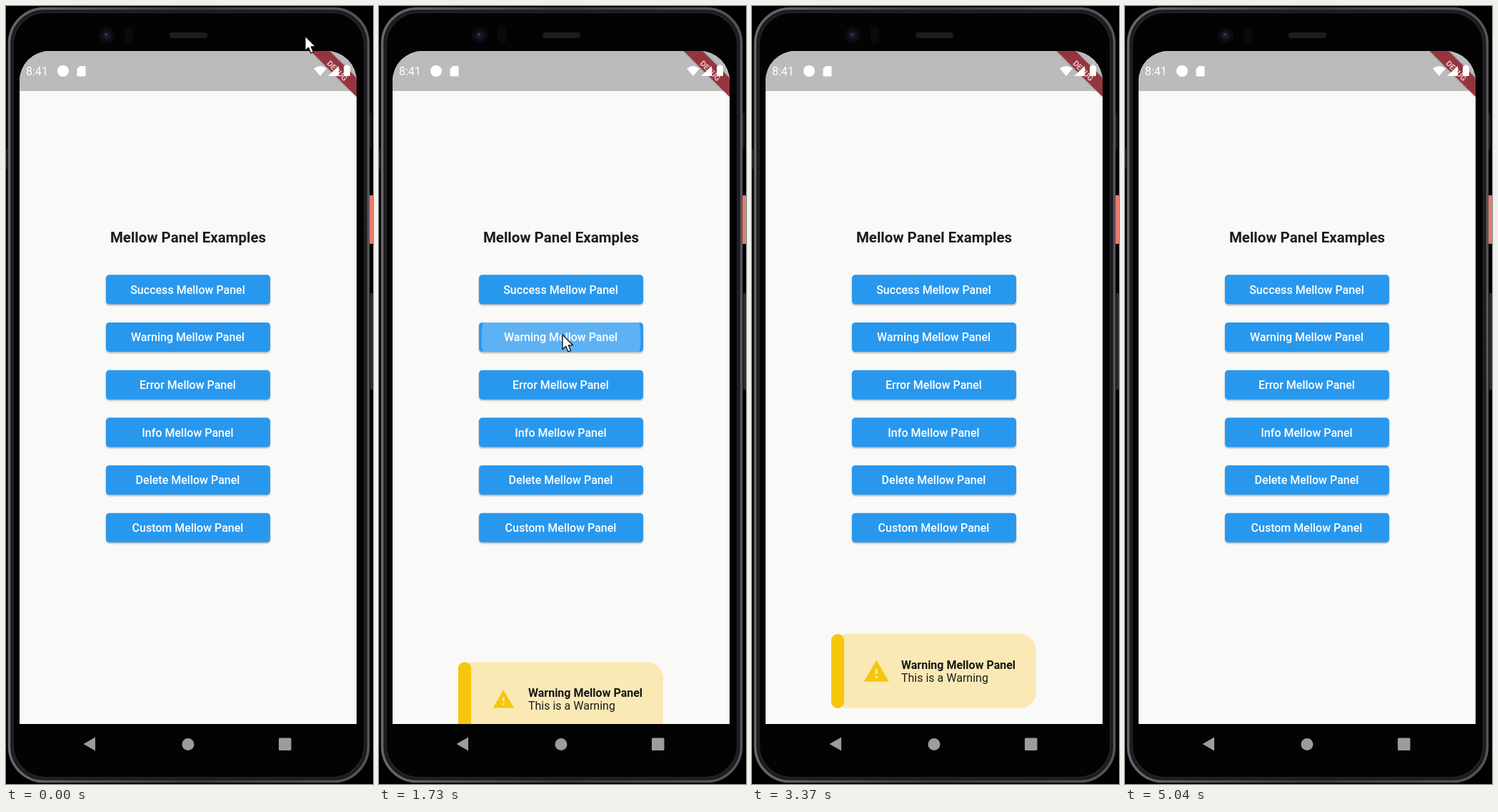
Write an HTML page that moves like this. It is 514x1089 px and loops after 5.08 s.

```html
<!DOCTYPE html>
<html lang="en">
<head>
<meta charset="utf-8">
<title>Toast demo</title>
<style>
  html, body { margin: 0; width: 100%; height: 100%; overflow: hidden; background: #000; }
  svg { display: block; width: 100vw; height: 100vh; }
  text { font-family: Roboto, "Noto Sans", sans-serif; }
</style>
</head>
<body>
<svg viewBox="0 0 514 1089" preserveAspectRatio="none">
  <defs>
    <linearGradient id="rim" x1="0" x2="1" y1="0" y2="0">
      <stop offset="0" stop-color="#68686c"/>
      <stop offset=".5" stop-color="#3a3a3e"/>
      <stop offset="1" stop-color="#55555b"/>
    </linearGradient>
    <clipPath id="screen"><path d="M19 1005V105A42 42 0 0 1 61 63H449A42 42 0 0 1 491 105V1005Z"/></clipPath>
    <clipPath id="pressed"><rect x="140" y="443" width="230" height="41" rx="4.6"/></clipPath>
    <filter id="soft" x="-5%" y="-20%" width="110%" height="150%"><feGaussianBlur stdDeviation="1.2"/></filter>
  </defs>

  <!-- phone body -->
  <rect width="514" height="1089" fill="#000"/>
  <rect x="0" y="200" width="2" height="28" fill="#1c1c1e"/>
  <rect x="509" y="265" width="5" height="68" rx="1" fill="#ee786c"/>
  <rect x="510" y="402" width="4" height="135" rx="1" fill="#2b2b2d"/>
  <rect x="509" y="150" width="3" height="50" fill="#161617"/>
  <rect x="3" y="2" width="506" height="1085" rx="50" fill="#1c1c1f"/>
  <rect x="4.5" y="3.500" width="503" height="1082" rx="49" fill="none" stroke="url(#rim)" stroke-width="3.5"/>
  <rect x="10" y="9" width="492" height="1071" rx="45" fill="#030304" stroke="#222226" stroke-width="2"/>
  <circle cx="141" cy="41" r="11" fill="#0c0c10"/>
  <circle cx="141" cy="41" r="6" fill="#151826"/>
  <circle cx="140" cy="40" r="2" fill="#343a5c"/>
  <rect x="166" y="29" width="12" height="24" rx="5" fill="#0a0a0b"/>
  <rect x="229" y="37" width="53" height="8" rx="4" fill="#1f1c1a"/>

  <!-- app -->
  <g clip-path="url(#screen)">
    <rect x="19" y="63" width="472" height="943" fill="#f9f9f8"/>
    <rect x="19" y="63" width="472" height="56" fill="#bbb"/>
    <text x="255" y="330.5" font-size="20.5" font-weight="700" text-anchor="middle" fill="#1c1c1c">Mellow Panel Examples</text>
    <g id="buttons"></g>
    <circle id="ripple" cy="464" fill="#fff" clip-path="url(#pressed)"/>
    <g id="toast">
      <rect x="111" y="879" width="287" height="104" rx="23" fill="#fae9b5"/>
      <rect x="111" y="879" width="18" height="104" rx="9" fill="#f5c60c"/>
      <path id="icon" fill="#f5c60c" fill-rule="evenodd" d="M-11 9.5H11L0 -9.5ZM1 6.5H-1V4.5H1ZM1 2.5H-1V-1.5H1Z"/>
      <text x="209" y="928" font-size="16" font-weight="700" fill="#171717">Warning Mellow Panel</text>
      <text x="209" y="946" font-size="16" fill="#1c1c1c">This is a Warning</text>
    </g>
    <path d="M427 63H453L491 101V127Z" fill="#000" opacity=".45" filter="url(#soft)"/>
    <path d="M427 63H453L491 101V127Z" fill="#96343d"/>
    <text transform="translate(464 90.5) rotate(45)" y="4" font-size="11" font-weight="700" text-anchor="middle" fill="#e2c8ca">DEBUG</text>
  </g>

  <!-- status icons -->
  <g fill="#fff">
    <text x="28" y="97" font-size="16">8:41</text>
    <circle cx="80" cy="91" r="8"/>
    <path d="M103.5 84H110Q111.5 84 111.5 85.5V97Q111.5 98.5 110 98.5H101Q99.5 98.5 99.5 97V88Z"/>
    <path d="M431 87.5Q440 80.5 449 87.5L440 98Z"/>
    <path d="M466 84V98H451Z"/>
    <path d="M475.5 84V82.5H479.5V84H481Q482 84 482 85V97Q482 98 481 98H474Q473 98 473 97V85Q473 84 474 84Z"/>
  </g>

  <!-- navigation -->
  <g fill="#9c9c9c">
    <path d="M108.500 1033L125 1023.5V1042.5Z"/>
    <circle cx="255" cy="1033.5" r="8.5"/>
    <rect x="382" y="1024.5" width="17.5" height="17.5" rx="1.5"/>
  </g>

  <path id="cursor" d="M0 0V20.5L4.7 16.2L8 24L11.6 22.4L8.3 14.8H14.5Z" fill="#fff" stroke="#111" stroke-width="1.3" stroke-linejoin="round"/>
</svg>
<script>
const LOOP = 5080;
const TOAST_IN = 1610, SLIDE = 350, TOAST_OUT = 4650, FADE = 200;
const BEAT = 1310;
const PATH = [
  [0, 419, 42], [700, 205, 662], [1000, 205, 662],
  [1450, 257, 460], [1850, 257, 460], [2350, 530, 380]
];

const $ = id => document.getElementById(id);
const ramp = (t, from, length) => Math.min(1, Math.max(0, (t - from) / length));
const smooth = x => x * x * (3 - 2 * x);

$('buttons').innerHTML = ['Success', 'Warning', 'Error', 'Info', 'Delete', 'Custom'].map((kind, i) => {
  const y = 376.3 + i * 66.67;
  const box = 'x="140" width="230" height="41" rx="4.6"';
  return `<rect ${box} y="${y + 1.7}" fill="#000" opacity=".3" filter="url(#soft)"/>
    <rect ${box} y="${y}" fill="#2898ee"/>
    <text x="254.5" y="${y + 26.5}" font-size="16" font-weight="500" text-anchor="middle" fill="#fff">${kind} Mellow Panel</text>`;
}).join('');

function cursorAt(t) {
  const i = PATH.findIndex(p => p[0] > t);
  if (i < 0) return PATH[PATH.length - 1].slice(1);
  const [t0, x0, y0] = PATH[i - 1], [t1, x1, y1] = PATH[i];
  const k = smooth(ramp(t, t0, t1 - t0));
  return [x0 + (x1 - x0) * k, y0 + (y1 - y0) * k];
}

function draw(t) {
  $('cursor').setAttribute('transform', `translate(${cursorAt(t)})`);

  const grow = ramp(t, 1570, 165);
  const ripple = $('ripple');
  ripple.setAttribute('cx', 257 - 2 * grow);
  ripple.setAttribute('r', 12 + 102 * grow);
  ripple.setAttribute('opacity', grow > 0 ? 0.25 * (1 - ramp(t, 1740, 200)) : 0);

  const left = (1 - ramp(t, TOAST_IN, SLIDE)) ** 3;
  const toast = $('toast');
  toast.setAttribute('transform', `translate(0 ${140 * left})`);
  toast.setAttribute('opacity', t < TOAST_IN ? 0 : 1 - ramp(t, TOAST_OUT, FADE));

  // the icon swells and shrinks linearly
  const phase = Math.max(0, t - TOAST_IN) / BEAT % 2;
  const width = 28.4 + 10 * (1 - Math.abs(1 - phase));
  $('icon').setAttribute('transform', `translate(174.3 930.7) scale(${width / 22})`);
}

const start = performance.now();
function tick() {
  draw((performance.now() - start) % LOOP);
  requestAnimationFrame(tick);
}
tick();
</script>
</body>
</html>
```
